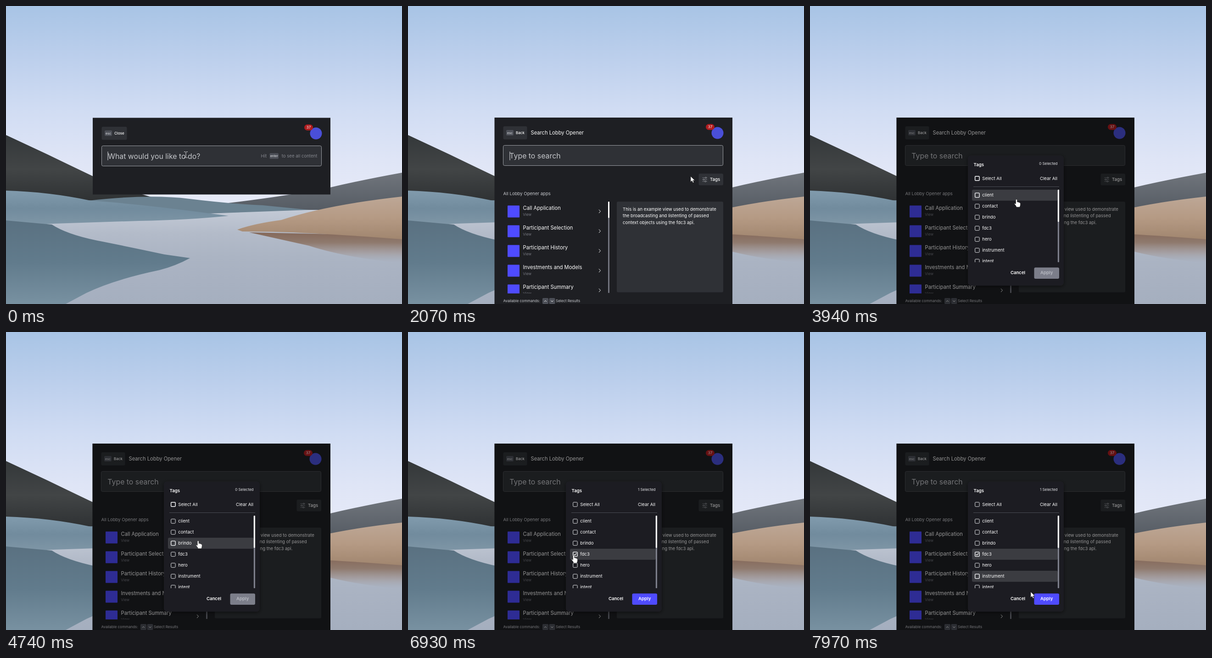
Animation of 863 by 649 pixels, one loop 8 s. Source, as an HTML page:

```html
<!DOCTYPE html>
<html lang="en">
<head>
<meta charset="utf-8">
<title>Tag filter</title>
<style>
  html, body { margin: 0; height: 100%; overflow: hidden; }
  svg { display: block; width: 100vw; height: 100vh; }
  text { font-family: Inter, sans-serif; white-space: pre; }
</style>
</head>
<body>
<svg id="stage" viewBox="0 0 863 649" preserveAspectRatio="none"></svg>
<script>
const LOOP = 8000;
const PANEL = '#2f3136', DARK = '#1e1f23', ACCENT = '#4f4bff', MUTED = '#85878e';
const PRODUCT = 'Lobby Opener';
const APPS = ['Call Application', 'Participant Selection', 'Participant History', 'Investments and Models', 'Participant Summary'];
const TAGS = ['client', 'contact', 'brindo', 'fdc3', 'hero', 'instrument', 'intent'];
const CHECKED_ROW = 3;

// Pointer moves: start, end, number of hard steps, destination
const MOVES = [
  [1800, 1800, 1, 480, 292], [1950, 2070, 2, 616, 371], [2220, 2830, 5, 649, 381],
  [2940, 3940, 8, 450, 421], [4130, 4420, 3, 432, 430], [4740, 4970, 3, 392, 504],
  [5280, 5280, 1, 380, 507], [5380, 5380, 1, 374, 500], [5600, 5600, 1, 369, 492],
  [5940, 6930, 7, 361, 486], [7070, 7970, 7, 481, 566]
];
const TIME = { caretOff: 370, search: 900, grow: 1050, filled: 1250, blur: 2830, popup: 2940, click: 6380 };

// Text is placed by the vertical middle of its capitals
const text = (x, y, str, size, fill = '#fff', weight = 400, anchor = 'start', id = '') =>
  `<text id="${id}" x="${x}" y="${y + size * .36}" font-size="${size}" fill="${fill}" font-weight="${weight}" text-anchor="${anchor}">${str}</text>`;
const rect = (x, y, w, h, fill, r = 0, more = '') =>
  `<rect x="${x}" y="${y}" width="${w}" height="${h}" fill="${fill}" rx="${r}" ${more}/>`;
const line = (d, stroke = '#fff', width = 1, more = '') =>
  `<path d="${d}" fill="none" stroke="${stroke}" stroke-width="${width}" ${more}/>`;
const shape = (d, fill) => `<path d="${d}" fill="${fill}"/>`;
const gradient = (id, ...colors) => `<linearGradient id="${id}" x2="0" y2="1">` +
  colors.map((c, i) => `<stop offset="${i / (colors.length - 1)}" stop-color="${c}"/>`).join('') + '</linearGradient>';
const clip = (id, x, y, w, h, inner = '') =>
  `<clipPath id="${id}">${rect(x, y, w, h, '#000', 0, inner)}</clipPath>`;

const defs = `<defs>
  ${gradient('sky', '#a8c4e5', '#bccfec', '#d0dcf3', '#dfe5f6', '#e8ebf8')}
  ${gradient('rock', '#34383a', '#424546', '#2d3032')}
  ${gradient('ridge', '#70757c', '#555b63')}
  ${gradient('meadow', '#819bad', '#718b9d', '#8097a7')}
  ${gradient('shore', '#5a7181', '#617b8c', '#7891a1')}
  ${gradient('water', '#c3cad6', '#b3bbc9', '#abb4c3', '#a8b1c1', '#a5afbf')}
  ${gradient('straw', '#bda796', '#b59a84', '#a1866f')}
  ${gradient('reflection', '#85695a', '#8f7a6e', '#a39b9ccc', '#a7acb800')}
  ${clip('windowClip', 188, 243, 520, 406, 'id="clipRect"')}
  ${clip('appClip', 207, 425, 235, 201)}
  ${clip('tagClip', 350, 400, 194, 158)}
  <filter id="shadow" x="-20%" y="-20%" width="140%" height="140%"><feDropShadow dx="0" dy="2" stdDeviation="4" flood-opacity=".5"/></filter>
</defs>`;

const landscape =
  rect(0, 0, 863, 446, 'url(#sky)') +
  shape('M0 281L90 323Q150 352 190 371Q250 398 320 417L420 430H0Z', 'url(#rock)') +
  shape('M863 363Q780 378 707 395Q600 416 475 430L620 446H863Z', 'url(#ridge)') +
  rect(0, 444, 863, 205, 'url(#water)') +
  shape('M180 424Q310 409 400 420T560 434L660 444L440 452L180 450Z', '#6b8291') +
  shape('M0 402Q95 405 180 423Q310 434 400 446L485 457Q400 466 290 468L105 474L0 480Z', 'url(#meadow)') +
  shape('M530 493L863 500V560Q740 548 660 522Z', 'url(#reflection)') +
  shape('M504 487Q540 474 600 466Q700 433 863 415V508Q760 500 700 497Q600 491 515 491Z', 'url(#straw)') +
  shape('M0 467L100 476Q135 499 210 513Q290 529 345 541L401 549Q370 566 335 575Q235 596 175 625L130 649H0Z', 'url(#shore)');

const key = (x, y, w, h, label = '') =>
  rect(x, y, w, h, '#4c4f57', 2) + text(x + w / 2, y + h / 2, label, 7, '#e6e7ea', 400, 'middle');

const header = (label, width) =>
  rect(207.5, 262, width, 28.5, PANEL, 3) + key(214, 270, 16, 12, 'esc') + text(235, 276, label, 8, '#fff', 500) +
  '<circle cx="674.5" cy="276.5" r="13" fill="#4a4fd8"/>' +
  rect(649, 257, 19, 13, '#b01c1f', 6.5) + text(658.5, 263.5, '37', 8, '#fff', 400, 'middle');

const input = (hint, id) =>
  rect(207.5, 303.5, 479, 44, PANEL, 3, `id="${id}" stroke="#9c9fa5"`) + text(221.3, 326, hint, 15.85, '#c5c7cb');

const home = `<g id="home">${rect(189, 243.5, 518, 167, DARK)}<g transform="translate(1 1)">
  ${header('Close', 55)}${input('What would you like to do?', 'homeInput')}
  ${text(554.5, 326, 'Hit', 9.6, MUTED)}${key(573.5, 319.5, 19.5, 12.5, 'enter')}
  ${text(677.3, 326, 'to see all content', 9.6, MUTED, 400, 'end')}</g></g>`;

const appRow = (name, i) => `<g transform="translate(0 ${i * 43})">
  ${rect(217, 434.5, 26, 26, ACCENT, 1)}${text(250.5, 440, name, 11.2)}${text(250.5, 454, 'View', 8, '#777981')}
  ${line('M416 443.5L419.5 447.2L416 451')}</g>`;

const sliders = line('M641.5 374H652M641.5 378H652M641.5 382H652', '#85878e', .9) +
  [[649, 374], [644.5, 378], [648, 382]].map(([x, y]) =>
    `<circle cx="${x}" cy="${y}" r="1.4" fill="${PANEL}" stroke="#a0a2a8" stroke-width=".8"/>`).join('');

const search = `<g id="search" clip-path="url(#windowClip)">
  ${rect(188.5, 243, 518.5, 406, DARK)}
  ${header('Back', 52)}${text(267.5, 276, 'Search ' + PRODUCT, 11.2)}${input('Type to search', 'searchInput')}
  ${rect(633.5, 365, 53.5, 25.5, PANEL, 3, 'id="tagsButton"')}${sliders}${text(658, 378, 'Tags', 9.6, '#fff', 500)}
  ${text(207.5, 409, `All ${PRODUCT} apps`, 9.6, '#c8cacf')}
  <g clip-path="url(#appClip)">${APPS.map(appRow).join('')}</g>
  ${rect(436, 426, 3, 199, '#73757f', 1)}${rect(436, 426, 3, 35.5, '#fff', 1)}
  ${rect(455, 426, 232, 197.5, PANEL, 3)}
  ${['This is an example view used to demonstrate', 'the broadcasting and listenting of passed', 'context objects using the fdc3 api.']
    .map((s, i) => text(468, 442.5 + i * 14.4, s, 9.6)).join('')}
  ${text(207.5, 642.5, 'Available commands:', 8, '#c8cacf')}
  ${key(293, 636, 13, 13)}${key(307.5, 636, 13, 13)}
  ${line('M297 644L299.5 641.5L302 644M311.5 641.5L314 644L316.5 641.5')}
  ${text(322, 642.5, 'Select Results', 8, '#c8cacf')}</g>`;

const checkbox = (y, id) => rect(359.7, y - 4.7, 9.4, 9.4, 'none', 1.5, `id="${id}" stroke="#e4e5e8"`);
const tagRow = (name, i) => {
  const y = 412 + i * 24;
  return rect(353, y - 12, 187, 24, '#3b3c41', 3, `id="row${i}"`) + checkbox(y, 'box' + i) + text(375.3, y, name, 9.6);
};

const popup = `<g id="popup">${rect(188.5, 243, 518.5, 406, '#000', 0, 'fill-opacity=".42"')}
  ${rect(344, 325.5, 209, 283.5, DARK, 7, 'filter="url(#shadow)"')}
  ${text(356.5, 345.5, 'Tags', 9.6, '#fff', 600)}${text(539.5, 343.5, '0 Selected', 8, '#e6e7ea', 400, 'end', 'count')}
  ${checkbox(375.5, 'boxAll')}${text(375.3, 375.5, 'Select All', 9.6)}${text(539, 375.5, 'Clear All', 9.6, '#fff', 400, 'end')}
  ${rect(356, 393, 187, 1, '#4b4d54')}
  <g clip-path="url(#tagClip)">${TAGS.map(tagRow).join('')}
    ${line('M361.7 484L363.7 486L367.2 481.8', '#fff', 1.2, 'id="tick"')}</g>
  ${rect(539.8, 400, 3.2, 158, '#7c7e8a', 1)}${rect(539.8, 400, 3.2, 70, '#fff', 1)}
  ${text(453, 581, 'Cancel', 9.6, '#fff', 600, 'middle')}
  ${rect(488.5, 569.5, 54.5, 24.5, ACCENT, 3, 'id="apply"')}
  ${text(515.7, 581, 'Apply', 9.6, '#fff', 600, 'middle', 'applyText')}</g>`;

const pointer = `<g id="pointer">
  <g id="beam">${line('M-4 -6.5H-1L0 -5.5L1 -6.5H4M-4 6.5H-1L0 5.5L1 6.5H4M0 -5.5V5.5', '#dcdde0')}</g>
  <path id="arrow" d="M0 0V12L3 9.5L5 14L7 13L5 8.8H9Z" fill="#fff" stroke="#222" stroke-width=".6"/>
  <path id="hand" d="M-1.5 1Q0 -1 1.5 1V6Q3 5 4 6.5Q6 5.8 6.5 7.5Q8.5 7 8.5 9V12Q8 15 7 17H0Q-1 14 -4.5 10Q-4.5 8 -1.5 10Z" fill="#fff" stroke="#222" stroke-width=".6"/>
</g>`;

const stage = document.getElementById('stage');
stage.innerHTML = defs + landscape + home + search +
  rect(188.5, 410, 518.5, 163.5, '#000', 0, 'id="unpainted"') +
  rect(221.5, 317, 1, 19, '#e6e7ea', 0, 'id="caret"') + popup + pointer;

const el = id => document.getElementById(id);
const show = (id, on) => el(id).setAttribute('visibility', on ? 'visible' : 'hidden');
const set = (id, name, value) => el(id).setAttribute(name, value);
const between = (v, a, b) => v >= a && v < b;

function pointerAt(t) {
  let x = 392, y = 324;
  for (const [start, end, steps, toX, toY] of MOVES) {
    if (t < start) break;
    const gap = (end - start) / Math.max(1, steps - 1);
    const done = t >= end ? 1 : (Math.floor((t - start) / gap) + 1) / steps;
    x += (toX - x) * done;
    y += (toY - y) * done;
  }
  return { x, y };
}

function draw(t) {
  const { x, y } = pointerAt(t);
  const searching = t >= TIME.search, open = t >= TIME.popup, picked = t >= TIME.click;

  show('home', !searching);
  show('search', searching);
  set('clipRect', 'height', t < TIME.filled ? 167 : 406);
  show('unpainted', between(t, TIME.grow, TIME.filled));
  show('caret', t < TIME.caretOff || between(t, TIME.search, 1470) || between(t, 1950, 2510));
  set('searchInput', 'stroke', t < TIME.blur ? '#9c9fa5' : '#4b4d52');

  const overButton = !open && x > 633 && between(y, 365, 391);
  set('tagsButton', 'fill', overButton ? '#3e4047' : PANEL);

  show('popup', open);
  set('popup', 'opacity', t < TIME.popup + 140 ? .55 : 1);
  const inList = open && between(x, 353, 540) && between(y, 400, 558);
  // The last row crossed stays lit for a moment after the pointer leaves the list
  const hovered = open && x < 540 && y >= 400 ? Math.min(5, Math.floor((y - 400) / 24)) : -1;
  TAGS.forEach((_, i) => {
    const lit = i === hovered || (picked && i === CHECKED_ROW);
    set('row' + i, 'opacity', lit ? 1 : 0);
    set('box' + i, 'stroke-width', lit ? 1.6 : 1);
  });
  set('boxAll', 'stroke-width', picked ? 1 : 1.7);
  set('tick', 'opacity', picked ? 1 : 0);
  el('count').textContent = `${picked ? 1 : 0} Selected`;
  set('apply', 'fill', picked ? ACCENT : '#7c7e8a');
  set('applyText', 'fill', picked ? '#fff' : '#b9bbc3');

  const beam = !open && between(x, 207, 688) && between(y, 303, 349);
  const hand = overButton || inList;
  set('pointer', 'transform', `translate(${x} ${y})`);
  show('beam', beam);
  show('hand', hand);
  show('arrow', !beam && !hand);
}

const began = performance.now();
function frame() {
  draw((performance.now() - began) % LOOP);
  requestAnimationFrame(frame);
}
frame();
</script>
</body>
</html>
```
